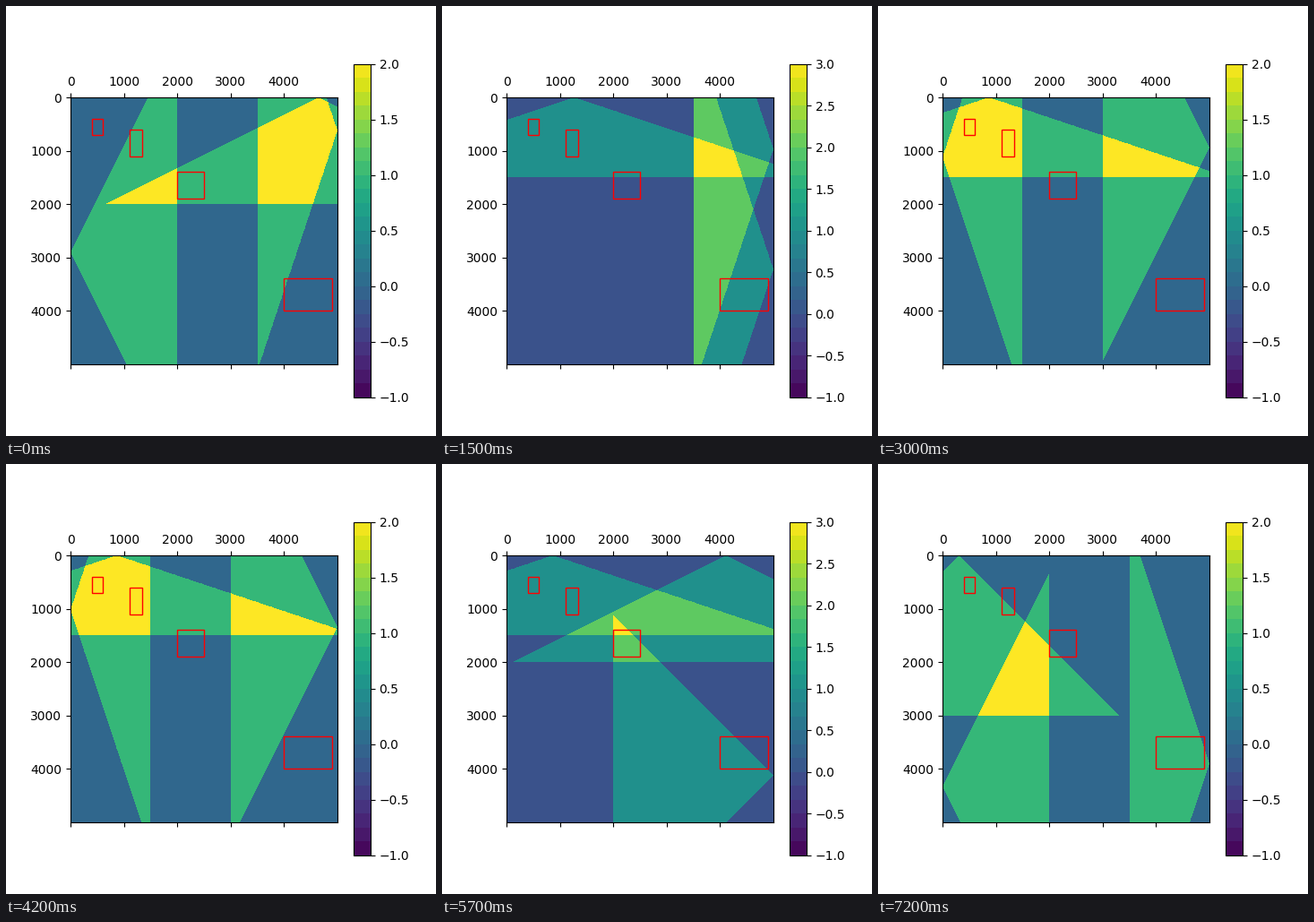
Write a matplotlib script that moves like this. It is 480x480 px and loops after 7500 ms.

```python
import numpy as np
import matplotlib.pyplot as plt
from matplotlib.animation import FuncAnimation
from matplotlib.cm import ScalarMappable
from matplotlib.colors import ListedColormap, Normalize
from matplotlib.patches import Rectangle

SIZE = 5000
CELLS = 1250
STEPS = 5            # frames per scene
SHIFT = 100          # distance of one beam move
BANDS = 24
INTERVAL = 300

axis = (np.arange(CELLS) + 0.5) * SIZE / CELLS
X, Y = axis[None, :], axis[:, None]


# Each beam lies between a straight edge and a line that bounces
# off a wall at pos; run is the inverse slope of that line.
def top(edge, run):
    return lambda pos: (Y > abs(X - pos) / run) & (Y < edge)


def left(edge, run):
    return lambda pos: (X > abs(Y - pos) / run) & (X < edge)


def right(edge, run):
    return lambda pos: (SIZE - X > abs(Y - pos) / run) & (X > edge)


west, east = left(2000, 2), right(3500, 3)
shallow, steep = top(1500, 3), top(2000, 2)

# Per scene: beam, bounce position at the start, moves made by the end.
SCENES = [
    [(west, 2900, 0), (east, 620, 3), (steep, 4650, 0)],
    [(shallow, 1270, -3), (east, 3220, 0), (east, 970, 4)],
    [(left(1500, 3), 1120, -1), (right(3000, 2), 940, 4), (shallow, 870, 0)],
    [(shallow, 570, 3), (steep, 4110, 0), (right(2000, 1), 3920, 2)],
    [(top(3000, 1), 305, 0), (west, 4330, 0), (east, 3900, 0)],
]

BOXES = [(400, 400, 200, 300), (1100, 600, 250, 500),
         (2000, 1400, 500, 500), (4000, 3400, 900, 600)]


def coverage(frame):
    """Number of beams over each cell."""
    scene, step = divmod(frame, STEPS)
    total = np.zeros((CELLS, CELLS))
    for beam, start, moves in SCENES[scene]:
        done = round(moves * step / (STEPS - 1))
        total += beam(start + SHIFT * done)
    return total


fig = plt.figure(figsize=(4.8, 4.8), dpi=100)
ax = fig.add_axes([0.15, 0.09, 0.775, 0.775])
image = ax.matshow(coverage(0), cmap="viridis", vmin=-1, vmax=2,
                   extent=(-0.5, SIZE - 0.5, SIZE - 0.5, -0.5))

viridis = plt.get_cmap("viridis")
bands = ListedColormap(viridis((np.arange(BANDS) + 0.5) / BANDS))
scale = ScalarMappable(Normalize(-1, 2), bands)
fig.colorbar(scale, ax=ax)

for x, y, w, h in BOXES:
    ax.add_patch(Rectangle((x, y), w, h, fill=False, edgecolor="red", linewidth=1))


def update(frame):
    total = coverage(frame)
    image.set_data(total)
    for mappable in (image, scale):
        mappable.set_clim(-1, total.max())
    return [image]


anim = FuncAnimation(fig, update, frames=STEPS * len(SCENES), interval=INTERVAL,
                     init_func=lambda: update(0), repeat=True, repeat_delay=0)
plt.show()
```
